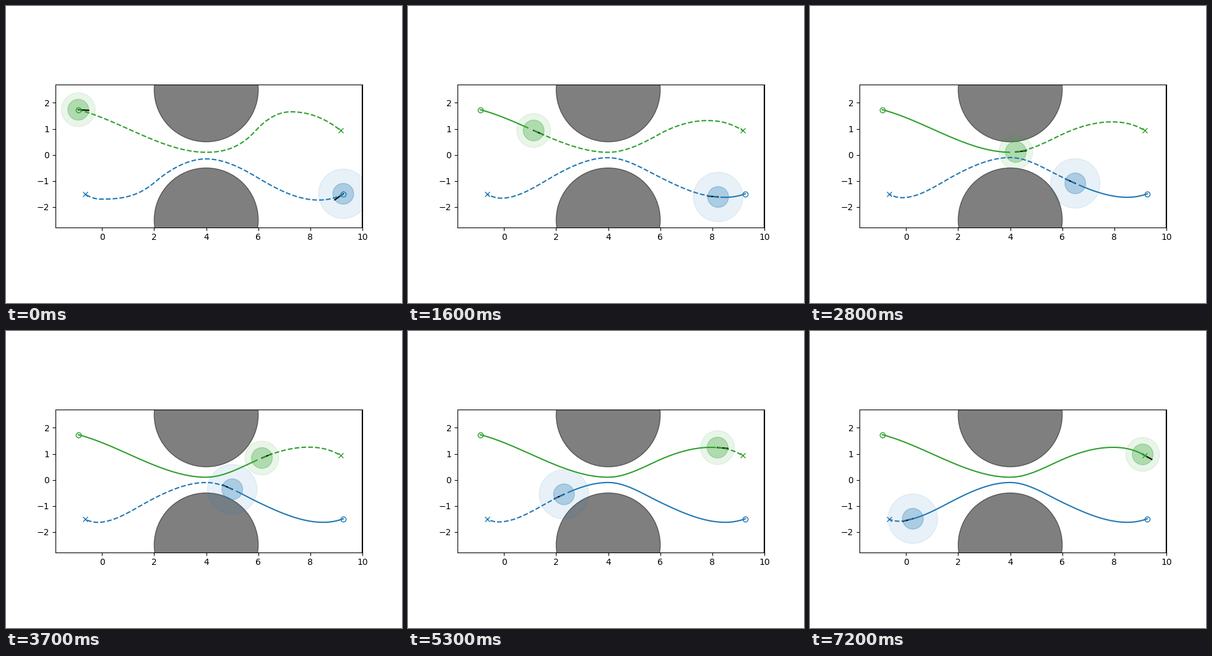
These frames come from a looping animation (640 by 480 pixels, 7.3 s). A matplotlib script:

```python
import numpy as np
import matplotlib.pyplot as plt
from matplotlib.animation import FuncAnimation
from matplotlib.patches import Circle

FRAMES = 73
INTERVAL = 100
STEP = INTERVAL / 1000
SETTLE = 0.9  # seconds for a first guess to relax to the final route
BODY = 0.4


def hermite(keys, x):
    """Cubic curve through (x, y, slope) keys with ascending x."""
    xs, ys, slopes = np.asarray(keys, dtype=float).T
    i = np.clip(np.searchsorted(xs, x) - 1, 0, len(xs) - 2)
    h = xs[i + 1] - xs[i]
    u = (x - xs[i]) / h
    rise = u * u * (3 - 2 * u)
    return (ys[i] + (ys[i + 1] - ys[i]) * rise
            + h * u * (1 - u) * ((1 - u) * slopes[i] - u * slopes[i + 1]))


class Robot:
    def __init__(self, ax, color, halo, goal_x, motion, guess, route,
                 heading, settle=SETTLE):
        self.goal_x = goal_x
        self.guess = np.array(guess)
        self.route = np.array(route)
        self.heading = heading
        self.settle = settle

        self.xs = hermite(motion, np.arange(FRAMES) * STEP)
        self.ys = hermite(route, self.xs)
        self.side = np.sign(goal_x - self.xs[0])

        start = self.xs[0], self.ys[0]
        self.halo = ax.add_patch(Circle(start, halo, color=color, alpha=0.1))
        self.body = ax.add_patch(Circle(start, BODY, color=color, alpha=0.3))
        self.arrow, = ax.plot([], [], color="k")
        self.past, = ax.plot([], [], color=color)
        self.future, = ax.plot([], [], "--", color=color)
        ax.plot(*start, "o", color=color, fillstyle="none")
        ax.plot(goal_x, hermite(route, goal_x), "x", color=color)

    def plan(self, t, x0, y0):
        """Route ahead: the first guess relaxes into the final route."""
        fade = np.exp(-t / self.settle)
        keys = self.route + (self.guess - self.route) * fade
        x = np.linspace(x0, self.goal_x, 90)
        y = hermite(keys, x)
        # Ease from the current position onto the plan.
        return x, y + (y0 - y[0]) * np.exp(-((x - x0) / 0.5) ** 2)

    def angle(self, t, x):
        dx = 0.03
        slope = np.diff(hermite(self.route, np.array([x - dx, x + dx])))[0]
        tangent = np.arctan(slope / (2 * dx))
        return tangent + (self.heading - tangent) * np.exp(-t / 0.35)

    def update(self, i):
        t = i * STEP
        x, y = self.xs[i], self.ys[i]
        self.halo.center = self.body.center = (x, y)
        a = self.angle(t, x)
        reach = BODY * self.side
        self.arrow.set_data([x, x + reach * np.cos(a)],
                            [y, y + reach * np.sin(a)])
        self.past.set_data(self.xs[:i], self.ys[:i])
        self.future.set_data(*self.plan(t, x, y))


fig = plt.figure(figsize=(6.4, 4.8), dpi=100)
ax = fig.add_subplot()
ax.set_aspect("equal")
ax.set_xlim(-1.79, 10)
ax.set_ylim(-2.785, 2.7)
ax.set_xticks(range(0, 11, 2))
ax.set_yticks(range(-2, 3))

for cy in (2.5, -2.5):
    ax.add_patch(Circle((4, cy), 2, color="k", alpha=0.5))
ax.axvline(10, color="k")

# Motion keys are (time, x, speed); route keys are (x, y, slope).
blue = Robot(
    ax, "tab:blue", 0.95, goal_x=-0.65,
    motion=[(0, 9.265, 0), (3.7, 5, -1.68), (7.2, 0.26, -0.4)],
    guess=[(-0.65, -1.515, -0.6), (-0.05, -1.7, 0), (2, -1.07, 0.85),
           (4, -0.155, 0), (6, -0.89, -0.6), (8.3, -1.735, 0),
           (9.265, -1.495, 0.6)],
    route=[(-0.65, -1.515, -0.3), (-0.3, -1.57, 0), (2, -0.7, 0.5),
           (4, -0.1, 0), (6, -0.86, -0.48), (8.5, -1.63, 0),
           (9.265, -1.495, 0.36)],
    heading=0.62,
    # The dip before the goal relaxes more slowly than the rest.
    settle=np.array([[5], [5]] + [[SETTLE]] * 5))

green = Robot(
    ax, "tab:green", 0.65, goal_x=9.16,
    motion=[(0, -0.915, 0), (2.2, 2.66, 2.75), (3.7, 6.14, 1.85),
            (7.2, 9.09, 0.25)],
    guess=[(-0.915, 1.735, -0.26), (4, 0.1, 0), (5.9, 0.93, 1.1),
           (7.25, 1.655, 0), (9.16, 0.94, -0.8)],
    route=[(-0.915, 1.735, -0.26), (4, 0.1, 0), (6, 0.78, 0.44),
           (7.95, 1.25, 0), (9.16, 0.94, -0.6)],
    heading=-0.06)


def update(i):
    for robot in (blue, green):
        robot.update(i)


anim = FuncAnimation(fig, update, frames=FRAMES, interval=INTERVAL,
                     repeat=True, repeat_delay=0)
plt.show()
```
